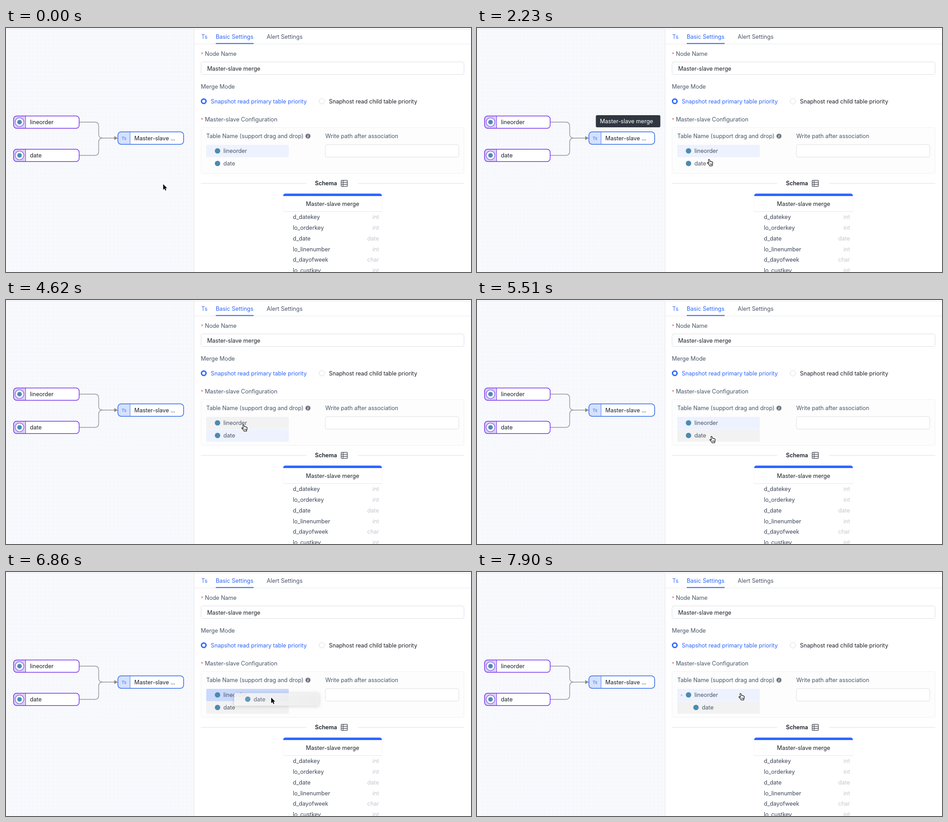
Write an HTML page with a canvas that moves like this. It is 1031 by 543 pixels and loops after 8 s.

```html
<!DOCTYPE html>
<html lang="en">
<head>
<meta charset="utf-8">
<title>Merge node settings</title>
<style>
  html, body { margin: 0; width: 100%; height: 100%; overflow: hidden; background: #fff; }
  canvas { display: block; }
</style>
</head>
<body>
<canvas id="stage" width="1031" height="543"></canvas>
<script>
const ctx = document.getElementById('stage').getContext('2d');
const LOOP = 8000;
const BLUE = '#2c65ff', PURPLE = '#7233ee', INK = '#1d2129', LABEL = '#4a5567', MARK = '#4b8bb0';
const FONT = 'Inter, "Open Sans", sans-serif';

const ARROW = new Path2D('M0 0V12.4L2.9 9.7L4.8 14.2L6.8 13.3L4.9 9H8.8Z');
const HAND = new Path2D('M4.2 9.5L3.2 2.4Q3 .8 4.3 .7Q5.5 .7 5.8 2L6.6 5.6Q7 4.9 8 5Q8.9 5.1 9 6' +
  'Q9.6 5.5 10.4 5.8Q11 6.1 11.1 6.9Q12 6.5 12.5 7.3Q13 8.4 12.6 10.5Q12.3 12.5 11.5 13.5V15.5H5.5' +
  'L5.3 14Q3 11.5 .8 9.2Q.3 8.2 1.2 7.8Q2.2 7.6 4.2 9.5Z');

// time, cursor kind, hot spot
const POINTER = [
  [0, 'arrow', 348.5, 347.5],
  [440, 'arrow', 340, 343],
  [600, 'arrow', 324, 331],
  [750, 'arrow', 317, 326],
  [1040, 'arrow', 319, 312],
  [1190, 'arrow', 327, 280],
  [1340, 'move', 335, 252],
  [1490, 'move', 337.5, 246],
  [1780, 'move', 345, 247],
  [1930, 'arrow', 424, 264],
  [2080, 'arrow', 484, 283],
  [2230, 'hand', 514, 292],
  [2380, 'hand', 524, 295],
  [2530, 'hand', 528, 296],
  [4170, 'hand', 528, 293],
  [4320, 'hand', 527, 286],
  [4470, 'hand', 526, 280],
  [4620, 'hand', 526, 277],
  [5220, 'hand', 524, 284],
  [5370, 'hand', 521, 296],
  [5510, 'hand', 519.5, 303],
  [6410, 'arrow', 527, 301],
  [6560, 'arrow', 550, 294],
  [6710, 'arrow', 575, 286],
  [6860, 'arrow', 588, 279.5],
  [7010, 'arrow', 587, 274],
  [7160, 'arrow', 585, 271],
  [7900, 'hand', 584, 270]
];

function text(str, x, midY, color = INK, o = {}) {
  const size = o.size || 12.6;
  ctx.font = `${o.weight || 400} ${size}px ${FONT}`;
  ctx.letterSpacing = '-0.05px';
  ctx.textAlign = o.align || 'left';
  ctx.fillStyle = color;
  ctx.fillText(str, x, midY + size * 0.364);
}

function rect(x, y, w, h, color) {
  ctx.fillStyle = color;
  ctx.fillRect(x, y, w, h);
}

function box(x, y, w, h, r, fill, stroke, lw = 1) {
  ctx.beginPath();
  ctx.roundRect(x, y, w, h, r);
  if (fill) { ctx.fillStyle = fill; ctx.fill(); }
  if (stroke) { ctx.strokeStyle = stroke; ctx.lineWidth = lw; ctx.stroke(); }
}

function disc(x, y, r, fill, stroke, lw = 1) {
  box(x - r, y - r, 2 * r, 2 * r, r, fill, stroke, lw);
}

function trace(d, color, lw) {
  ctx.strokeStyle = color;
  ctx.lineWidth = lw;
  ctx.stroke(new Path2D(d));
}

function node(x, y, label, color, tint) {
  box(x, y, 145.5, 27.5, 7, '#fff');
  box(x, y, 26.5, 27.5, [7, 0, 0, 7], tint);
  rect(x + 26.25, y, 1, 27.5, color);
  box(x, y, 145.5, 27.5, 7, null, color, 1.5);
  text(label, x + 36.3, y + 13.75);
}

function sourceNode(y, label) {
  node(16.75, y, label, PURPLE, '#dccdfb');
  disc(30, y + 13.75, 9.8, '#f6f2ff', '#7040dc', 1.1);
  disc(30, y + 13.75, 5, MARK);
}

function graph(hover, tip) {
  rect(0, 0, 417, 543, '#f8f9fd');
  for (let y = 8; y < 543; y += 9)
    for (let x = 5; x < 417; x += 9) rect(x, y, 1, 1, '#dfe1ea');

  trace('M163 209.5H197Q205.5 209.5 205.5 218V236Q205.5 245 214 245H241' +
        'M163 283.5H197Q205.5 283.5 205.5 275V254Q205.5 245 214 245', '#929297', 1.4);
  ctx.fillStyle = '#88888d';
  ctx.fill(new Path2D('M240 240.8L248 245L240 249.2Z'));

  sourceNode(195.75, 'lineorder');
  sourceNode(269.75, 'date');
  box(247, 230.25, 148, 29.5, 8, '#bdd1fd');
  node(248.25, 231.25, 'Master-slave ...', '#3c72ee', '#d4e1fe');
  text('Ts', 261.5, 245.5, '#4a7df2', { size: 9.4, weight: 500, align: 'center' });

  if (hover) {
    disc(394.5, 245, 5.3, '#fff', '#3c72ee', 1.2);
    for (const x of [307.5, 336.5]) disc(x, 273, 8, '#2a62ea', '#88a9f7', 1);
    trace('M303.5 273H311.5M307.5 269V277M333.5 270L339.5 276M339.5 270L333.5 276', '#fff', 1.2);
  }
  if (tip) {
    box(263.5, 194, 143, 27, 3, '#303741');
    text('Master-slave merge', 272.5, 207.5, '#fff');
  }
}

function radio(x, label, on) {
  disc(x, 163, on ? 5 : 6, '#fff', on ? BLUE : '#d5d8de', on ? 3 : 1);
  text(label, x + 15.5, 163, on ? BLUE : INK);
}

function required(label, y) {
  text('*', 432, y + 0.5, '#ee5a5f', { size: 11 });
  text(label, 441, y, LABEL);
}

function panel() {
  rect(417, 0, 614, 543, '#fff');
  rect(416.5, 2, 1, 541, '#e3e4ea');
  rect(0, 2, 1031, 1, '#e6e6ee');
  rect(417, 35, 614, 1, '#e8e9ee');
  text('Ts', 433, 19.5, '#3f72fa');
  text('Basic Settings', 465, 19.5, BLUE);
  text('Alert Settings', 578, 19.5, LABEL);
  rect(465, 33.5, 84, 2, BLUE);

  required('Node Name', 57);
  box(432.5, 75.5, 583, 28, 4, '#fff', '#dcdee3');
  text('Master-slave merge', 446, 90);
  text('Merge Mode', 432, 130, LABEL);
  radio(438.5, 'Snapshot read primary table priority', true);
  radio(700.5, 'Snaphost read child table priority', false);

  required('Master-slave Configuration', 203);
  box(432.5, 221.5, 583, 102, 3, '#fdfdfe', '#f0f0f3');
  text('Table Name (support drag and drop)', 444, 240.5, LABEL);
  disc(669.5, 240.5, 5.6, '#737985');
  text('i', 669.5, 240.5, '#fff', { size: 8.5, weight: 'italic 700', align: 'center' });
  text('Write path after association', 708, 240.5, LABEL);
  box(708, 259.5, 296, 28, 4, '#fff', '#dcdee3');

  rect(432, 345.5, 234, 1, '#dcdee3');
  rect(781, 345.5, 235, 1, '#dcdee3');
  text('Schema', 685, 345.5, INK, { weight: 600 });
  box(743.2, 339, 13.6, 13.4, 1, '#fff', '#555a63', 1.5);
  trace('M743 343.5H757M743 348H757M747.5 339V352', '#555a63', 1.3);
  schema();
}

function schema() {
  box(614.5, 368.5, 219, 12, [5, 5, 0, 0], BLUE);
  rect(614, 374, 220, 169, '#fff');
  rect(614, 374, 1, 34, '#f7f7f9');
  rect(833, 374, 1, 34, '#f7f7f9');
  rect(614, 408, 220, 1, '#e6e7eb');
  text('Master-slave merge', 724, 391, INK, { align: 'center' });
  const fields = ['d_datekey int', 'lo_orderkey int', 'd_date date',
    'lo_linenumber int', 'd_dayofweek char', 'lo_custkey int'];
  fields.forEach((f, i) => {
    const [name, type] = f.split(' '), y = 420.8 + i * 23.75;
    text(name, 636, y, '#3c4658');
    text(type, 827, y, '#c3c6cd', { align: 'right' });
  });
}

function row(x, y, label, fill, indent = 0) {
  if (fill) box(x, y, 183, 27.5, 2, fill);
  disc(x + 25 + indent, y + 13.5, 6, MARK);
  text(label, x + 38 + indent, y + 13.5, LABEL);
}

function tree(t, dragging, dropped, p) {
  const ACTIVE = '#edf2fe', HOVER = '#f2f2f3', TARGET = '#cad9fc';
  const picked = t >= 3580 && t < 4920;
  const overTop = t >= 4320 && t < 5370;
  const overLow = (t >= 2530 && t < 4320) || t >= 5370;
  const target = dragging && t >= 6710;
  row(444, 260, 'lineorder', target ? TARGET : !picked ? ACTIVE : overTop ? HOVER : null);
  row(444, 288, 'date', picked ? ACTIVE : overLow ? HOVER : null, dropped ? 16.5 : 0);
  if (dropped) {
    ctx.fillStyle = '#c6c9d0';
    ctx.fill(new Path2D('M451 276L453.5 270.5L456 276Z'));
  }
  if (dragging) ghost(p[2] - 77, p[3] - 10);
}

function ghost(x, y) {
  const sheen = ctx.createLinearGradient(x - 5, 0, x + 183, 0);
  sheen.addColorStop(0, '#fbfbfc');
  sheen.addColorStop(1, '#f1f1f2');
  ctx.save();
  ctx.globalAlpha = 0.88;
  ctx.shadowColor = 'rgba(0,0,0,.2)';
  ctx.shadowBlur = 9;
  ctx.shadowOffsetY = 1;
  box(x - 5, y, 188, 28, 4, sheen);
  ctx.shadowColor = 'transparent';
  row(x, y, 'date');
  ctx.restore();
}

function cursor([, kind, x, y]) {
  ctx.save();
  ctx.translate(x, y);
  ctx.lineJoin = 'round';
  if (kind === 'arrow') {
    ctx.strokeStyle = '#fff';
    ctx.lineWidth = 1.8;
    ctx.stroke(ARROW);
    ctx.fillStyle = '#000';
    ctx.fill(ARROW);
  } else if (kind === 'hand') {
    ctx.translate(-4, -0.5);
    ctx.fillStyle = '#fff';
    ctx.fill(HAND);
    ctx.strokeStyle = '#000';
    ctx.lineWidth = 1.1;
    ctx.stroke(HAND);
    trace('M7 10V13.5M8.9 10V13.5M10.7 10V13.5', '#000', 0.8);
  } else {
    for (const [color, lw] of [['#fff', 3.4], ['#000', 1.5]]) {
      for (let i = 0; i < 4; i++) {
        trace('M0 0V-5', color, lw);
        const head = new Path2D('M0 -6.8L2.6 -3.8H-2.6Z');
        if (lw > 2) { ctx.lineWidth = 1.6; ctx.stroke(head); }
        ctx.fillStyle = color;
        ctx.fill(head);
        ctx.rotate(Math.PI / 2);
      }
    }
  }
  ctx.restore();
}

function draw(t) {
  const p = POINTER.findLast(k => k[0] <= t);
  graph(t >= 1340 && t < 1930, t >= 1780 && t < 2380);
  panel();
  tree(t, t >= 6410 && t < 7760, t >= 7760, p);
  cursor(p);
}

const start = performance.now();
function tick() {
  draw((performance.now() - start) % LOOP);
  requestAnimationFrame(tick);
}
tick();
</script>
</body>
</html>
```
